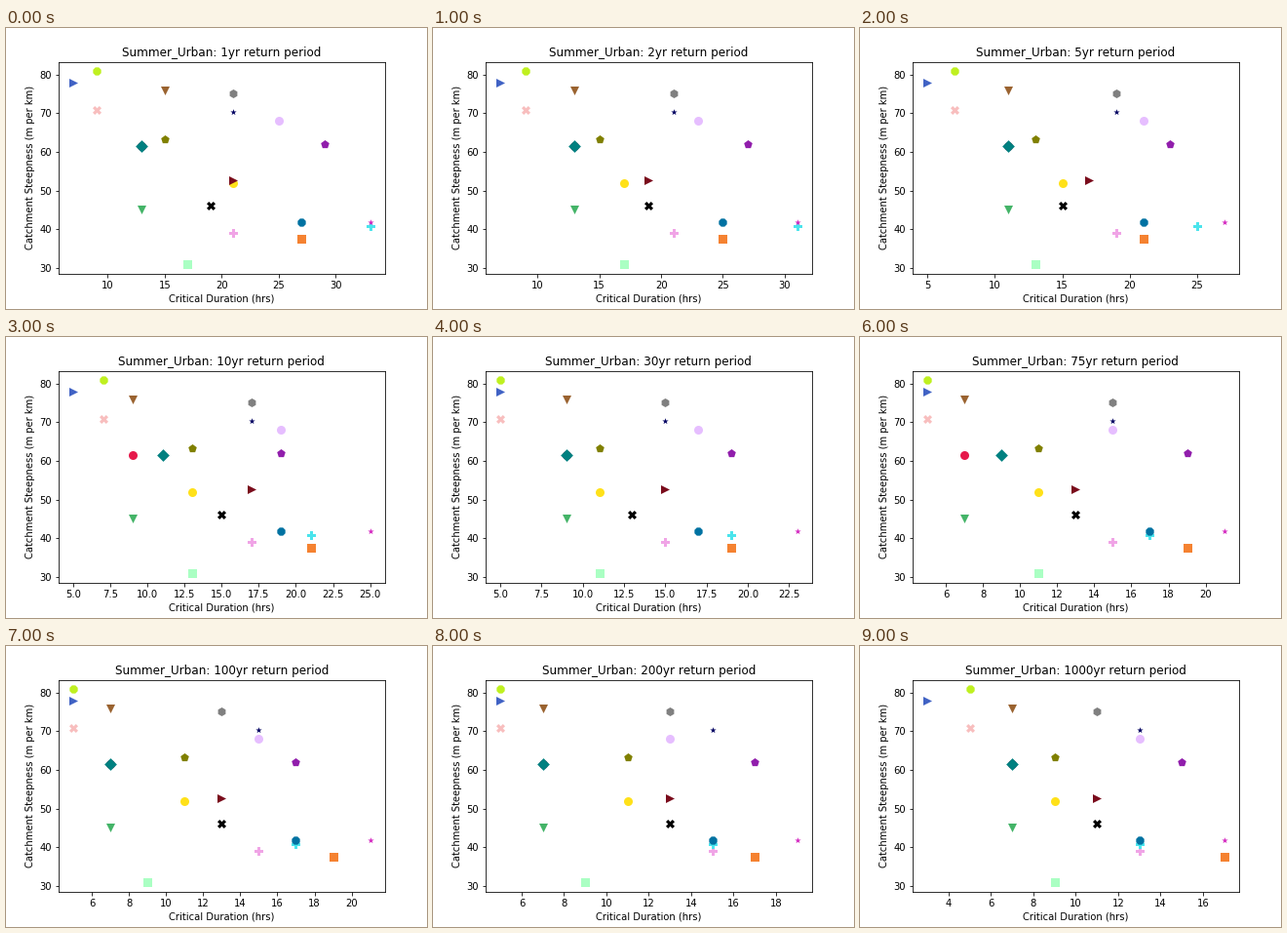
Animation, 432 px wide and 288 px high, one loop 10000 ms. Source, as a matplotlib script:

```python
import numpy as np
import matplotlib.pyplot as plt
from matplotlib.animation import FuncAnimation

PERIODS = [1, 2, 5, 10, 30, 50, 75, 100, 200, 1000]
KEY_PERIODS = [1, 10, 800]

# marker, colour, steepness, trend in hours at the key periods
CATCHMENTS = [
    (">", "#4062c4", 77.9, (7.5, 5, 3.7)),
    ("8", "#bff020", 80.82, (9.5, 6.2, 4.5)),
    ("X", "#f8bebe", 70.8, (9.5, 6.2, 4.5)),
    ("v", "#9a6330", 75.9, (15, 9.2, 6.2)),
    ("h", "#808080", 75.0, (21.6, 16.8, 10.8)),
    ("o", "#e6beff", 68.1, (24.6, 18.1, 12)),
    ("*", "#000060", 70.4, (21.6, 16.8, 13)),
    ("p", "#911eac", 61.9, (29.5, 19.9, 15.9)),
    ("p", "#808000", 63.3, (15.7, 12.6, 9)),
    ("o", "#e6194b", 61.4, (13.5, 8.9, 6.1)),
    ("D", "#008080", 61.6, (13.8, 10.1, 6.05)),
    ("o", "#ffe119", 51.8, (20.1, 12.6, 9)),
    (">", "#7a0c1c", 52.6, (20.8, 16.1, 11)),
    ("v", "#44b468", 45.2, (13.5, 8.9, 6.1)),
    ("X", "#000000", 46.0, (19.7, 14.2, 11)),
    ("P", "#f0a4e6", 39.1, (21.6, 16.8, 13)),
    ("P", "#4ae4ec", 40.8, (33.9, 21.5, 13)),
    ("8", "#0072a2", 41.8, (27.3, 18.5, 13.9)),
    ("s", "#f58231", 37.5, (26.2, 20.1, 16.5)),
    ("*", "#d428c0", 41.7, (33, 24.4, 16.5)),
    ("s", "#aaffc3", 30.92, (17.75, 12.1, 8.05)),
]

plt.rcParams["font.family"] = "DejaVu Sans"
plt.rcParams["text.kerning_factor"] = 6
fig, ax = plt.subplots(figsize=(6, 4), dpi=72)
fig.subplots_adjust(left=0.125, right=0.9, bottom=0.125, top=0.88)


def duration(trend, period):
    """Trend is linear in log(period); storms last an odd number of hours."""
    hours = np.interp(np.log(period), np.log(KEY_PERIODS), trend)
    return 2 * np.floor(hours / 2) + 1


def padded(values, pad=0.05):
    low, high = min(values), max(values)
    gap = (high - low) * pad
    return low - gap, high + gap


def draw(i):
    ax.clear()
    hours = [duration(row[3], PERIODS[i]) for row in CATCHMENTS]
    for x, (marker, color, steepness, _) in zip(hours, CATCHMENTS):
        size = 44 if marker == "*" else 81
        ax.scatter(x, steepness, s=size, marker=marker, color=color,
                   linewidths=0)
    ax.set_xlim(padded(hours))
    ax.set_ylim(padded([row[2] for row in CATCHMENTS]))
    ax.set_title(f"Summer_Urban: {PERIODS[i]}yr return period")
    ax.set_xlabel("Critical Duration (hrs)")
    ax.set_ylabel("Catchment Steepness (m per km)")


anim = FuncAnimation(fig, draw, frames=len(PERIODS), interval=1000,
                     init_func=lambda: draw(0), repeat=True, repeat_delay=0)
plt.show()
```
